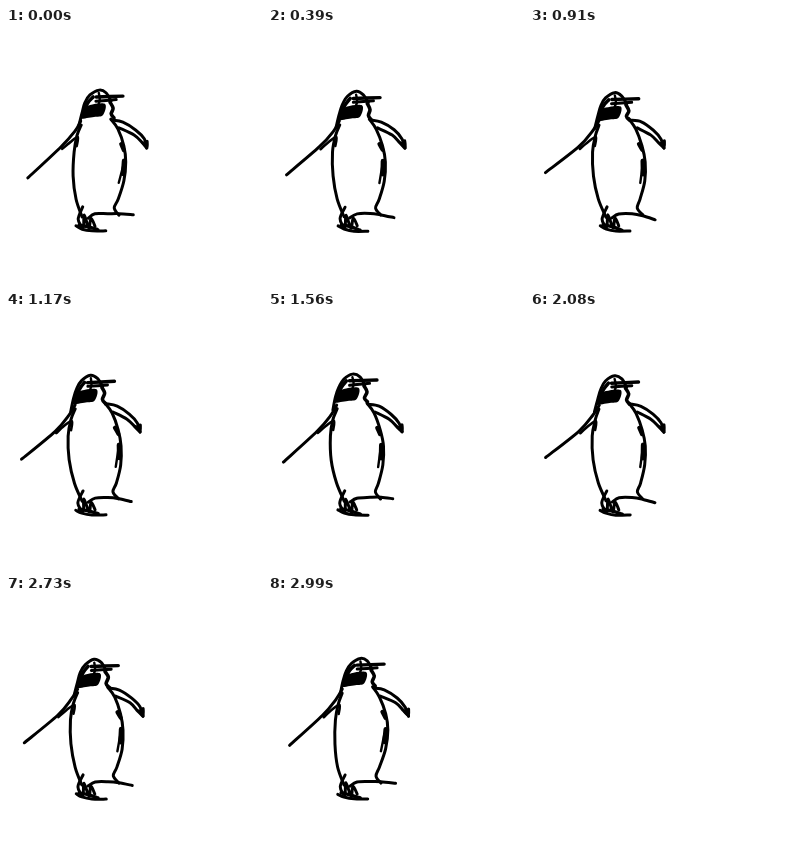
These frames come from a looping animation (256 by 256 pixels, 3.12 s). An HTML page with a canvas:

```html
<!DOCTYPE html>
<html lang="en">
<head>
<meta charset="utf-8">
<title>Penguin</title>
<style>
html, body { margin: 0; width: 100%; height: 100%; overflow: hidden; background: #fff; }
canvas { display: block; width: 100vw; height: 100vh; }
</style>
</head>
<body>
<canvas id="stage" width="256" height="256"></canvas>
<script>
const ctx = document.getElementById('stage').getContext('2d');
const STEP = 130, STEPS = 24;

function randomFrom(seed) {
  let s = seed * 7919 + 17;
  return () => {
    s = (s * 16807) % 2147483647;
    return s / 2147483647 - 0.5;
  };
}

// Smooth curve through all points
function trace(points) {
  ctx.beginPath();
  ctx.moveTo(...points[0]);
  for (let i = 0; i < points.length - 1; i++) {
    const p = points[i], q = points[i + 1];
    const before = points[i - 1] || p, after = points[i + 2] || q;
    ctx.bezierCurveTo(
      p[0] + (q[0] - before[0]) / 6, p[1] + (q[1] - before[1]) / 6,
      q[0] - (after[0] - p[0]) / 6, q[1] - (after[1] - p[1]) / 6, q[0], q[1]);
  }
}

function draw(step) {
  const phase = step / STEPS;
  // One long lean to the left per loop, two bobs of head, wing and toe
  const lean = 1 - Math.abs(Math.cos(Math.PI * phase)) ** 11;
  const bob = Math.cos(4 * Math.PI * phase);

  const rand = randomFrom(step + 1);
  const wobble = ([x, y]) => [x + rand() * 0.6, y + rand() * 0.6];
  const sway = ([x, y]) => [x - 6 * lean * Math.max(0, Math.min(1, (190 - y) / 70)), y];
  const nod = ([x, y]) => [x - 8.3 * lean, y + 1.4 - 1.4 * bob];
  const line = (points, width = 3) => {
    ctx.lineWidth = width;
    trace(points.map(wobble));
    ctx.stroke();
  };
  const body = (points, width) => line(points.map(sway), width);
  const head = (points, width) => line(points.map(nod), width);

  ctx.fillStyle = '#fff';
  ctx.fillRect(0, 0, 256, 256);
  ctx.fillStyle = ctx.strokeStyle = '#000';
  ctx.lineCap = ctx.lineJoin = 'round';

  // head
  head([[73, 98], [76, 85], [79, 75], [84, 67], [93, 62], [100, 65], [105, 73]]);
  head([[78, 84], [82, 75], [87, 69]], 3.5);
  trace([[77, 81], [84, 77], [99, 76], [97, 87], [88, 89], [75, 91]].map(nod));
  ctx.fill();
  head([[93, 65], [94, 72], [92, 78]], 2.4);
  head([[90, 69], [117, 68]], 3.4);
  head([[90, 73], [110, 71.5]]);
  head([[104, 74], [107, 80], [105, 86], [108, 90]], 3.6);

  // left wing
  const wing = [22 - 6.5 * lean, 147 + 3 * bob];
  line([...[[75, 93], [69, 103], [55, 119]].map(sway), wing]);
  body([[56, 121], [64, 114], [72, 109], [71, 118]], 2.6);

  // right wing
  const tip = [141 - 7 * lean, 120];
  const nearTip = (dx, dy) => [tip[0] + dx, tip[1] + dy];
  line([...[[106, 92], [117, 94]].map(sway), nearTip(-11, -18), nearTip(-3, -9), tip]);
  line([sway([113, 100]), nearTip(-13, -13), nearTip(-5, -5), tip]);
  line([nearTip(-4, -5), nearTip(0, -1), nearTip(0, -7)], 3.2);

  // body
  body([[75, 97], [71, 108], [68, 124], [67, 148], [70, 171], [76, 189]]);
  body([[105, 91], [112, 101], [118, 118], [120, 134], [118, 153], [112, 171], [108, 180], [113, 187]]);
  body([[115, 116], [118, 122]], 4);
  body([[118, 133], [117, 146]], 4.8);
  body([[117, 138], [113, 155]], 2.4);

  // feet
  const toe = [127.5 - 2.5 * lean, 189.5 - 2.8 * bob];
  line([[82, 190], [89, 186], [102, 185.5], [113, (toe[1] + 184) / 2], toe]);
  line([[77, 179], [72, 191], [77, 199], [78, 187], [83, 200], [85, 190], [89, 198]]);
  line([[70, 198], [76, 201], [86, 203], [100, 203]]);
  line([[73, 197], [83, 199], [92, 202]], 3.4);
}

function tick() {
  draw(Math.floor(performance.now() / STEP) % STEPS);
  requestAnimationFrame(tick);
}
tick();
</script>
</body>
</html>
```
